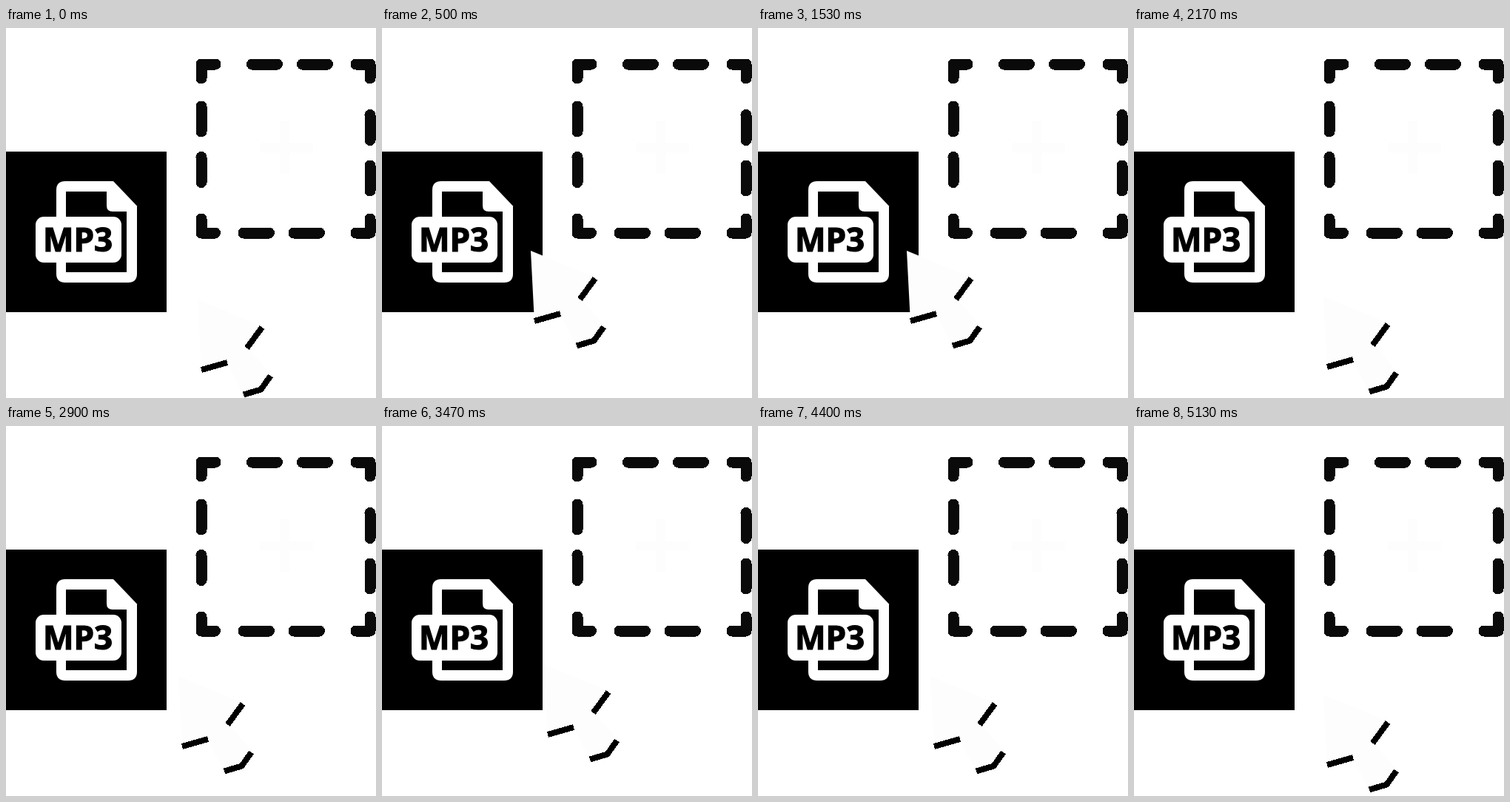
Recreate the animation shown at these times as an HTML page. Size 500x500 px, loop 5210 ms.

```html
<!DOCTYPE html>
<html lang="en">
<head>
<meta charset="utf-8">
<title>Drag a file</title>
<style>
  html, body { margin: 0; width: 100%; height: 100%; overflow: hidden; background: #fff; }
  svg { display: block; width: 100vw; height: 100vh; }
  text { font: 700 44px "Open Sans", "Noto Sans", sans-serif; stroke: #000; stroke-width: 1.2px; }
  .crisp { shape-rendering: crispEdges; }
</style>
</head>
<body>
<svg viewBox="0 0 500 500">
  <!-- drop area -->
  <path d="M343 162H415M377 126V197" stroke="#fdfdfd" stroke-width="13"/>
  <path class="crisp" fill="none" stroke="#0a0a0a" stroke-width="15" stroke-linecap="round" stroke-linejoin="round"
    d="M283 49H264V68M473 49H492V68M264 258V277H282.500M473 277H492V258
       M332.500 49H366.500M400.500 49H434.500M321 277H355.500M389 277H423.500
       M264 106V140M264 174.500V208.500M492 117.500V151.500M492 186V220"/>

  <!-- file icon -->
  <path d="M0 167H217V384H0Z"/>
  <path fill="#fff" d="M80 207H145L177 240.500V332Q177 344 165 344H80Q68 344 68 332V219Q68 207 80 207Z"/>
  <path d="M81 221H136V240Q136 248 144 248H163V330H81Z"/>
  <rect x="40" y="255" width="116" height="62" rx="11" fill="#fff"/>
  <text x="50" y="301.500">MP3</text>

  <g id="cursor">
    <path fill="#fdfdfd" d="M259 367L349 404L326 432L360 470L345 490L321 497L299 453L264 464Z"/>
    <path class="crisp" fill="none" stroke="#000" stroke-width="8"
      d="M346 404.500L325.500 432.500M264 462L299 452M321 495.500L344.500 488.500L357.500 470"/>
  </g>
</svg>
<script>
  const LOOP = 5210, POSES = 13, CYCLES = 5;
  const reach = { x: -59, y: -66.5 };
  const cursor = document.getElementById("cursor");
  const start = performance.now();

  // 12.5 poses a second, shown on a grid of 30 ticks a second
  function poseAt(t) {
    const tick = Math.floor((t + 5) * 30 / 1000);
    return Math.min(Math.floor(tick * 5 / 12), POSES * CYCLES - 1);
  }

  function draw() {
    const pose = poseAt((performance.now() - start) % LOOP);
    const swing = (1 - Math.cos(2 * Math.PI * pose / POSES)) / 2;
    const x = Math.round(reach.x * swing), y = Math.round(reach.y * swing);
    cursor.setAttribute("transform", `translate(${x} ${y})`);
    requestAnimationFrame(draw);
  }
  draw();
</script>
</body>
</html>
```
